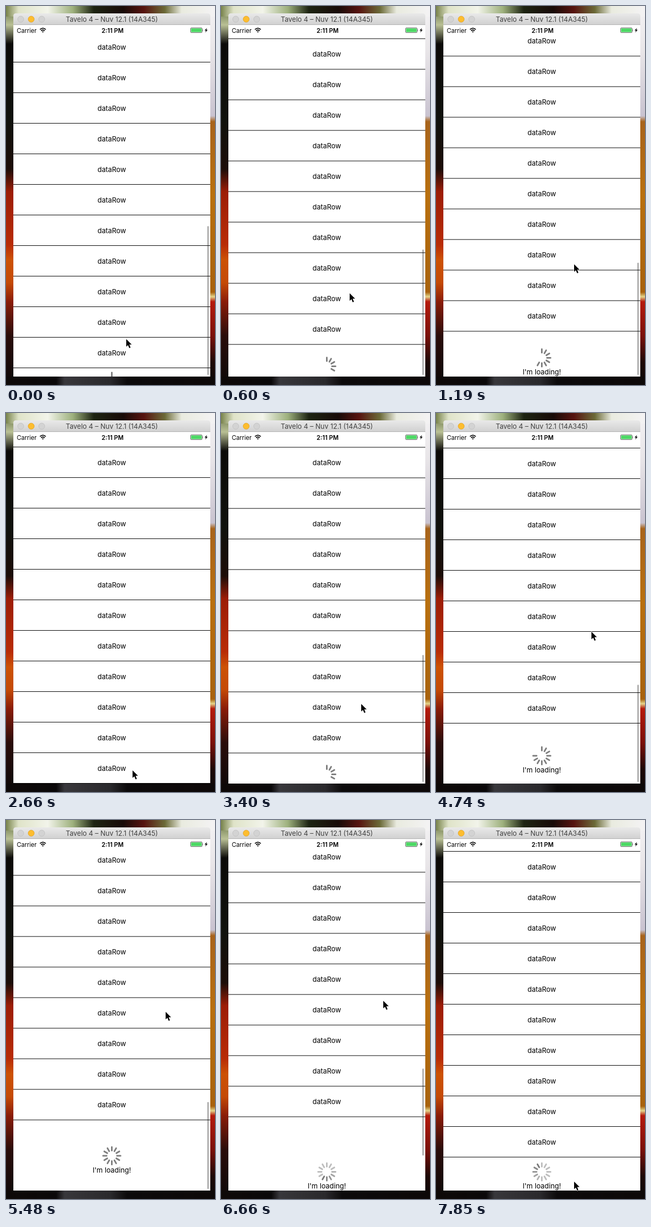
An HTML page that plays this animation: 398 px wide and 719 px high, repeating every 7.99 s.

```html
<!DOCTYPE html>
<html lang="en">
<head>
<meta charset="utf-8">
<title>Pull up to load more</title>
<style>
  html, body { margin: 0; width: 100%; height: 100%; overflow: hidden; background: #0b0707; }
  svg { display: block; width: 398px; height: 719px; }
  text { font-family: Inter, Roboto, sans-serif; font-size: 13.3px; text-anchor: middle; }
  .title { font-size: 13px; fill: #404040; }
  .status { font-size: 11.6px; }
  .clock { font-weight: 600; }
</style>
</head>
<body>
<svg viewBox="0 0 398 719">
  <defs>
    <linearGradient id="topEdge">
      <stop offset="0" stop-color="#77824a"/><stop offset=".06" stop-color="#dfe3c8"/>
      <stop offset=".2" stop-color="#f2f4ea"/><stop offset=".32" stop-color="#9db07c"/>
      <stop offset=".42" stop-color="#1d2412"/><stop offset=".56" stop-color="#180b08"/>
      <stop offset=".66" stop-color="#571410"/><stop offset=".76" stop-color="#6b6a38"/>
      <stop offset=".84" stop-color="#e9ebdf"/><stop offset="1" stop-color="#f4f3f4"/>
    </linearGradient>
    <linearGradient id="leftEdge" x2="0" y2="1">
      <stop offset="0" stop-color="#5d6a3c"/><stop offset=".05" stop-color="#b9c095"/>
      <stop offset=".1" stop-color="#0b0a08"/><stop offset=".3" stop-color="#10120d"/>
      <stop offset=".43" stop-color="#1c0d08"/><stop offset=".49" stop-color="#9c1d06"/>
      <stop offset=".63" stop-color="#b82c06"/><stop offset=".67" stop-color="#cc5205"/>
      <stop offset=".73" stop-color="#c44a06"/><stop offset=".78" stop-color="#8a1c08"/>
      <stop offset=".87" stop-color="#2a0d0a"/><stop offset="1" stop-color="#0c0808"/>
    </linearGradient>
    <linearGradient id="rightEdge" x2="0" y2="1">
      <stop offset="0" stop-color="#f4f3f4"/><stop offset=".12" stop-color="#e8e5e8"/>
      <stop offset=".29" stop-color="#c9c3d0"/><stop offset=".305" stop-color="#a8641c"/>
      <stop offset=".5" stop-color="#b9700f"/><stop offset=".755" stop-color="#a8620d"/>
      <stop offset=".767" stop-color="#e5d58a"/><stop offset=".78" stop-color="#b51a0c"/>
      <stop offset=".87" stop-color="#7a1009"/><stop offset=".94" stop-color="#1d0806"/>
      <stop offset="1" stop-color="#0b0707"/>
    </linearGradient>
    <linearGradient id="bottomEdge">
      <stop offset="0" stop-color="#0e0908"/><stop offset=".24" stop-color="#0a0809"/>
      <stop offset=".28" stop-color="#38373b"/><stop offset=".5" stop-color="#2a292c"/>
      <stop offset=".58" stop-color="#0c0a0b"/><stop offset="1" stop-color="#0d0808"/>
    </linearGradient>
    <linearGradient id="bar" x2="0" y2="1">
      <stop offset="0" stop-color="#e9e9e9"/><stop offset="1" stop-color="#d0d0d0"/>
    </linearGradient>
    <clipPath id="view"><path d="M14 56H389V703H14z"/></clipPath>
  </defs>

  <path fill="url(#leftEdge)" d="M0 0H14V719H0z"/>
  <path fill="url(#rightEdge)" d="M389 0h9V719h-9z"/>
  <path fill="url(#topEdge)" d="M0 0H398V20H0z"/>
  <path fill="url(#bottomEdge)" d="M0 703H398V719H0z"/>

  <path fill="#fff" d="M14 30H389V703H14z"/>
  <path fill="url(#bar)" d="M14 36V19q0-5 5-5H384q5 0 5 5V36z"/>
  <path fill="#b3b3b3" d="M14 35H389v1H14z"/>
  <g stroke-width=".8">
    <circle cx="28" cy="25" r="5.8" fill="#d3d3d3" stroke="#bfbfbf"/>
    <circle cx="48" cy="25" r="5.8" fill="#fdbd2f" stroke="#dfa023"/>
    <circle cx="68" cy="25" r="5.8" fill="#d3d3d3" stroke="#bfbfbf"/>
  </g>
  <text class="title" x="201.5" y="30">Tavelo 4 – Nuv 12.1 (14A345)</text>

  <text class="status" x="39.5" y="50.5">Carrier</text>
  <g fill="none" stroke="#000" stroke-width="1.7">
    <path d="M64.6 44.6q5.6-5 11.2 0M66.7 47q3.5-3 7 0"/>
  </g>
  <path d="M68.4 48.6q1.8-1.4 3.6 0l-1.8 2z"/>
  <text class="status clock" x="203" y="50.5">2:11 PM</text>
  <rect x="351.5" y="41.5" width="22" height="9" rx="1.5" fill="#fff" stroke="#444" stroke-width=".8"/>
  <path fill="#4cd964" d="M352.5 42.5h20v7h-20z"/>
  <path fill="#444" d="M374.5 44q1.8 2 0 4z"/>
  <path d="M382.6 41.5l-4.4 5h2.6l-1.4 4 4.6-5.2h-2.6z"/>

  <g clip-path="url(#view)">
    <g id="rows"></g>
    <g id="spinner"></g>
    <text id="label" x="201.5">I'm loading!</text>
    <rect id="thumb" x="383.5" width="2.5" rx="1.25" fill="#000" fill-opacity=".36"/>
  </g>
  <path id="cursor" d="M0 0V14.2L3.3 11.2 5.8 17 8.2 16 5.8 10.3H10.3z" stroke="#fff" stroke-width="1.4" stroke-linejoin="round" paint-order="stroke"/>
</svg>

<script>
const LOOP = 7990, STEPS = 54, ROW = 58, BOTTOM = 703, LOAD_STEP = 41;

// Tracks are [step, value] pairs, except footY, which maps pull distance to spinner centre.
const pull = [[0, 17], [3, 50], [6, 85], [7, 88], [8, 86.5], [10, 74], [13, 30], [15, 6], [16, 1], [18, 1],
  [19, 4], [21, 32], [24, 72], [28, 99.5], [32, 115], [37, 134.5], [41, 141.5], [45, 140.5],
  [47, 138], [49, 100], [51, 70], [52, 65], [53, 64]];
const cursorX = [[0, 229], [4, 245], [8, 263], [13, 255], [18, 241], [24, 272], [28, 289],
  [37, 304], [45, 309], [48, 304], [51, 275], [53, 263]];
const cursorY = [[0, 632], [4, 545], [7, 486], [8, 490], [13, 590], [18, 678], [21, 615], [24, 520],
  [28, 456], [37, 364], [41, 342], [45, 343], [48, 380], [51, 610], [53, 686]];
const thumbAlpha = [[0, 1], [14, 1], [16, 0], [18, 0], [20, 1], [49, 1], [52, 0]];
const footY = [[0, 723], [17, 712], [86.5, 667.5], [99.5, 661], [134.5, 637], [150, 627]];

const byId = id => document.getElementById(id);
const set = (node, attrs) => { for (const key in attrs) node.setAttribute(key, attrs[key]); };
function add(parent, tag, attrs) {
  const node = document.createElementNS('http://www.w3.org/2000/svg', tag);
  set(node, attrs);
  return parent.appendChild(node);
}
function sample(track, x) {
  const i = track.findIndex(point => point[0] > x);
  if (i < 0) return track[track.length - 1][1];
  if (i === 0) return track[0][1];
  const [x0, y0] = track[i - 1], [x1, y1] = track[i];
  return y0 + (y1 - y0) * (x - x0) / (x1 - x0);
}

const rows = Array.from({ length: 12 }, () => {
  const text = add(byId('rows'), 'text', { x: 201.5 });
  text.textContent = 'dataRow';
  return { text, line: add(byId('rows'), 'rect', { x: 14, width: 375, height: 1 }) };
});
const spokes = Array.from({ length: 12 }, (_, i) => add(byId('spinner'), 'rect',
  { x: -1.5, y: -18, width: 3, height: 9.5, rx: 1.3, transform: `rotate(${i * 30})` }));

function drawSpokes(distance, loading, step) {
  const head = 7 + Math.floor((step - 45) * LOOP / STEPS / 70 + 0.01);
  const shown = Math.floor((distance + 4) / 11);
  spokes.forEach((spoke, i) => {
    const age = (((head - i) % 12) + 12) % 12;
    const grey = loading ? Math.min(190, 122 + age * 14) : 127;
    set(spoke, { fill: `rgb(${grey},${grey},${grey})`, opacity: loading || i < shown ? 1 : 0 });
  });
}

function draw(time) {
  const step = Math.floor((time % LOOP + 8) / LOOP * STEPS) % STEPS;
  const loading = step >= LOAD_STEP;
  const distance = Math.round(sample(pull, step) * 2) / 2;
  const end = BOTTOM - distance;

  rows.forEach(({ text, line }, i) => {
    const y = end - i * ROW;
    set(line, { y });
    set(text, { y: Math.floor(y) - 23 });
  });

  const foot = loading ? 667.5 : sample(footY, distance);
  set(byId('spinner'), { transform: `translate(201.5 ${foot})` });
  set(byId('label'), { y: Math.round(foot + 31.5) });
  drawSpokes(distance, loading, step);

  const height = (loading ? 305.5 : 299.5) - distance;
  set(byId('thumb'), { y: (loading ? 636.5 : 700) - height, height, opacity: sample(thumbAlpha, step) });
  const x = Math.round(sample(cursorX, step)), y = Math.round(sample(cursorY, step));
  set(byId('cursor'), { transform: `translate(${x} ${y})` });
}

function tick() {
  draw(performance.now());
  requestAnimationFrame(tick);
}
tick();
</script>
</body>
</html>
```
